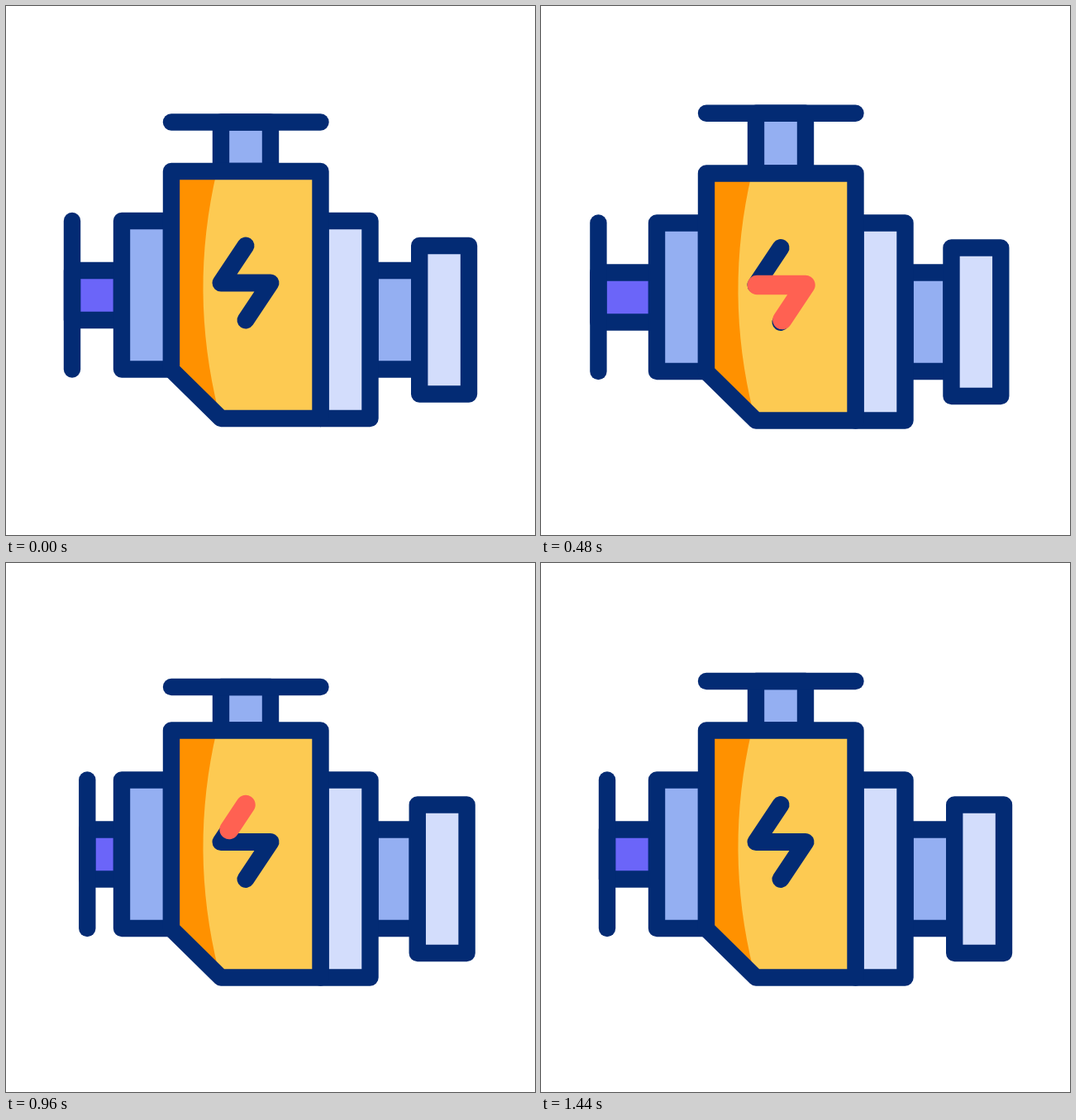
An HTML page with a canvas for the animation above (1480 ms loop, 640x640 px).

```html
<!DOCTYPE html>
<html>
<head>
<meta charset="utf-8">
<title>Engine</title>
<style>
  html, body { margin: 0; width: 100%; height: 100%; overflow: hidden; background: #fff; }
  canvas { display: block; }
</style>
</head>
<body>
<canvas width="640" height="640"></canvas>
<script>
const ctx = document.querySelector('canvas').getContext('2d');
const STEP = 40, STEPS = 37;
const NAVY = '#032b74', BLUE = '#94aff2', PALE = '#d3ddfc', PURPLE = '#6b65f9',
      YELLOW = '#fdca52', ORANGE = '#ff9100', RED = '#ff6152';

const BOLT = 'M290 380 L320 335 H260 L290 290';
const SIDE = Math.hypot(30, 45);
const BOLT_LENGTH = 2 * SIDE + 60;

// Eased progress from 0 to 1 between two steps
function ease(n, from, to) {
  const t = Math.min(1, Math.max(0, (n - from) / (to - from)));
  return t * t * (3 - 2 * t);
}

// Moves through [step, value] keys, easing between each pair
function track(n, keys) {
  let value = keys[0][1];
  for (let i = 1; i < keys.length; i++) {
    value += (keys[i][1] - keys[i - 1][1]) * ease(n, keys[i - 1][0], keys[i][0]);
  }
  return value;
}

function shape(d, fill, stroke = NAVY, width = 20.4) {
  const path = new Path2D(d);
  if (fill) {
    ctx.fillStyle = fill;
    ctx.fill(path);
  }
  if (stroke) {
    ctx.strokeStyle = stroke;
    ctx.lineWidth = width;
    ctx.stroke(path);
  }
}

const box = (x1, y1, x2, y2, fill, stroke) =>
  shape(`M${x1} ${y1}H${x2}V${y2}H${x1}Z`, fill, stroke);

function shake(n) {
  if (n < 2) return -1.25 * n;
  return 2.5 * Math.cos(n * Math.PI / 2);
}

function drawSpark(n) {
  const head = BOLT_LENGTH * ease(n, 4.15, 16.9);
  const tail = BOLT_LENGTH * ease(n, 10.35, 29.8);
  if (head <= 0 || tail >= BOLT_LENGTH) return;
  ctx.setLineDash([head - tail, 2 * BOLT_LENGTH]);
  ctx.lineDashOffset = -tail;
  shape(BOLT, null, RED, 23.4);
  ctx.setLineDash([]);
}

function draw(n) {
  const top = track(n, [[1, 140.5], [11, 126], [20.3, 163], [26.2, 140.5]]);
  const left = track(n, [[3.8, 80], [14.6, 67.6], [22.9, 100], [29, 80]]);
  const right = track(n, [[8.8, 500.2], [19.3, 483.4], [27.8, 508.2], [33.8, 500.2]]);

  ctx.setTransform(1, 0, 0, 1, 0, 0);
  ctx.clearRect(0, 0, 640, 640);
  ctx.translate(0, shake(n));
  ctx.lineCap = ctx.lineJoin = 'round';

  // Pipes and their moving ends
  box(260, top, 320, 200, BLUE);
  shape(`M200 ${top}H380.5`);
  box(left, 320, 140, 380, PURPLE);
  shape(`M${left} 260V439.5`);
  box(440.5, 320, right, 439.5, BLUE);
  box(right, 290, right + 59.8, 469.5, PALE);

  // Housing
  box(140, 260, 200, 439.5, BLUE);
  box(380.5, 260, 440.5, 499, PALE);
  const body = 'M200 200H380.5V499H260L200 440Z';
  shape(body, YELLOW, null);
  shape('M200 200H255Q221 345 257 490L200 440Z', ORANGE, null);
  shape(body);

  shape(BOLT, null, NAVY, 21);
  drawSpark(n);
}

function tick() {
  draw(Math.floor(performance.now() / STEP) % STEPS);
  requestAnimationFrame(tick);
}
tick();
</script>
</body>
</html>
```
